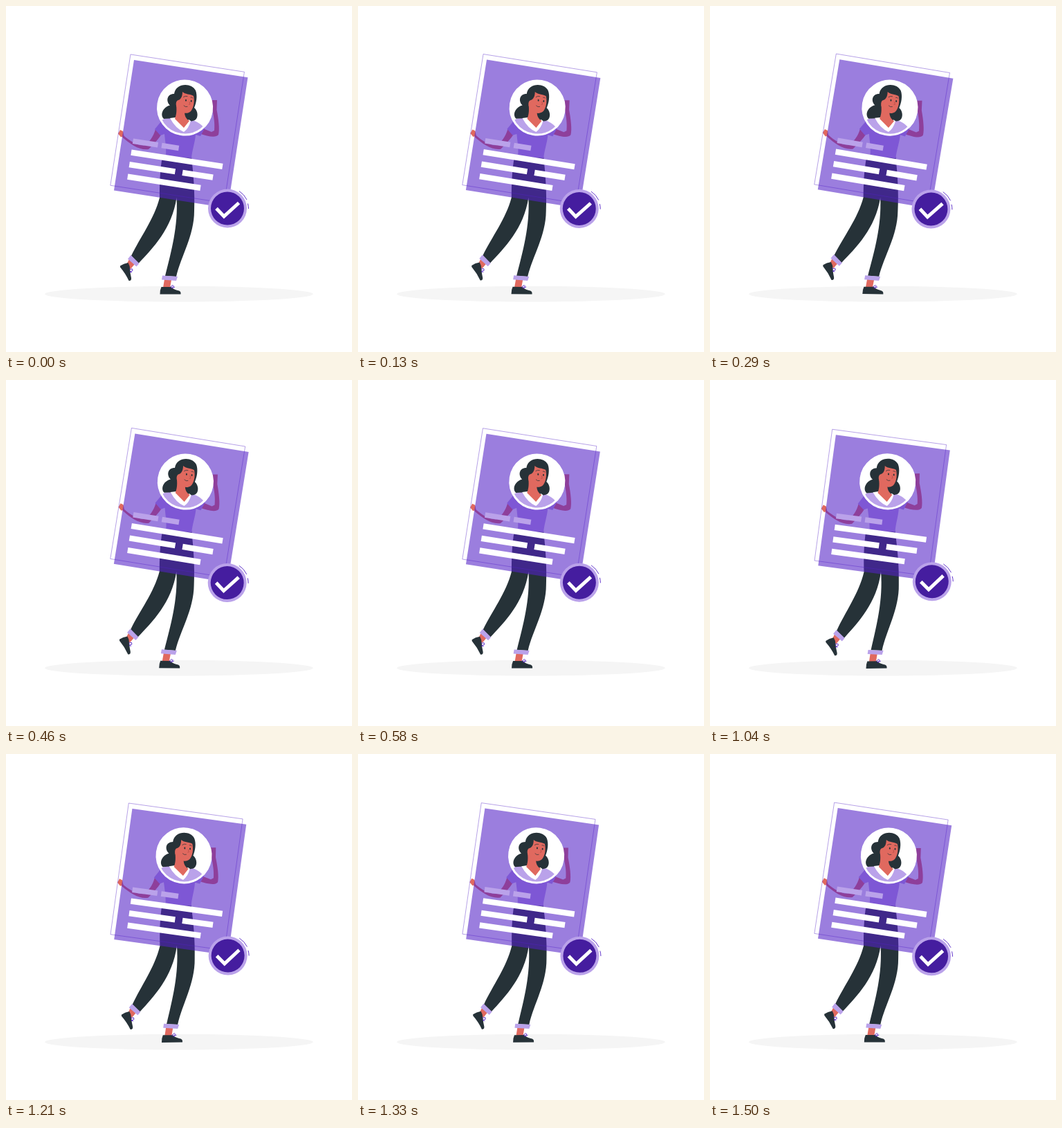
An HTML page for the animation above (1.54 s loop, 500x500 px).

```html
<!DOCTYPE html>
<html lang="en">
<head>
<meta charset="utf-8">
<title>Verified profile</title>
<style>
  html, body { margin: 0; height: 100%; overflow: hidden; background: #fff; }
  svg { display: block; width: 100vw; height: 100vh; }
  .dark { fill: #263238; }
  .skin { fill: #e0695f; }
  .lilac { fill: #baa2ea; }
  .white { fill: #fff; }
  .line { fill: none; stroke: #5322c6; }
  .ink { fill: none; stroke: #263238; stroke-width: .7; stroke-linecap: round; }
</style>
</head>
<body>
<svg viewBox="0 0 500 500">
  <ellipse cx="250" cy="416.2" rx="193.9" ry="11.3" fill="#f5f5f5"/>
  <g id="figure">
    <!-- feet -->
    <path class="skin" d="M229 395L239 396L237 407H227ZM178 366L186 373L180 380L174 374Z"/>
    <path class="dark" d="M224.5 406H238.5C242 409.500 246 410.500 250 411.500Q253 412.500 252.500 416.500H222.500Q222.500 410 224.500 406Z"/>
    <path class="dark" d="M165 375.500Q170 372 176.500 371Q179 375 179.300 381Q179.500 387 181 393Q181.500 397.500 177.500 397Q173 387 165 377.500Z"/>
    <path class="line" stroke-width=".9" d="M237 406.500L241 403.500L242.500 405L239 408L244 406M178.500 380.500L182.500 380L183 382.500L179 384L182 385"/>

    <!-- legs -->
    <path class="dark" d="M226 217C222 240 222 260 222 277C214 308 194 334 181 361L191.500 372C212 350 240 322 246.500 277C249 318 239 354 230 390L246 391C253 361 272 332 272 296C273 268 271 245 268 218Z"/>
    <path class="lilac" d="M226 389.500L248 391L246 397L225 395.500ZM180.500 360L192.500 372L188.500 376.500L176 365.500Z"/>

    <!-- arms -->
    <path class="skin" d="M216 178C213 189 207 197 200 201.500C189 202 179 195 169 186.500L168 189.500C180 200 193 209 206 207C213 200 220 193 225 185Z"/>
    <path class="skin" d="M162 184.500L165 179L169 181L170.500 188L166 189.500Z"/>
    <path class="skin" d="M282 176L297 182L301 180C302 168 300 160 298.500 150L297.500 136H305L304.500 150C307 163 309 178 307 186C303 191 292 188.500 279 184Z"/>

    <!-- torso -->
    <path class="lilac" d="M238 162C231 162 226 163 224 167L215 178L223 187L229 185C230 196 232 206 231 217L268 220C269 208 273 198 274 186L281 188L287 177C281 169 273 165 264 164Z"/>

    <!-- head -->
    <path class="dark" d="M243 127C245 111 268 110 274 122C277 130 275 140 272 147C278 152 278 162 273 165C267 168 260 166 257 160L246 162L228 163C222 157 227 146 237 143.500C231 138 232 127 243 127Z"/>
    <path class="white" d="M237 162L245 161L257 174L264 164L267 166Q264 177 257 182Q245 177 237 162Z"/>
    <path class="skin" d="M246 143C247 152 246 158 244 163L257 176L265 166C260 163 258 159 258 152Z"/>
    <path class="skin" d="M255 124C259 128 266 127 271 130C273 138 271 149 266 153C260 157 252 154 250 148C245 148 244 137 249 136C253 135 255 130 255 124Z"/>
    <g class="dark"><ellipse cx="260" cy="136.200" rx="1" ry="1.500"/><ellipse cx="267.700" cy="137.300" rx="1" ry="1.500"/></g>
    <path class="ink" d="M256.500 131.500Q259 129.500 262 130.500M267 132Q269 131.500 270 133M257 144Q259 146.500 262 145.500"/>
    <path class="line" style="stroke:#b84c47" stroke-width=".8" d="M265 138L266 142L264 142.300"/>

    <!-- card -->
    <g transform="translate(185 78) rotate(8.75)">
      <path fill="#5322c6" fill-opacity=".58" fill-rule="evenodd" d="M0 0H166.400V190.800H0ZM43.200 57a40 40 0 0 0 80 0a40 40 0 0 0 -80 0Z"/>
      <circle cx="83.200" cy="57" r="39" fill="none" stroke="#fff" stroke-width="3"/>
      <rect class="line" x="-6.200" y="-7.200" width="166.400" height="191.500" stroke-width=".4"/>
      <g class="lilac">
        <rect x="16.300" y="112.300" width="36.500" height="7.600"/>
        <rect x="58.300" y="112.300" width="25" height="7.600"/>
      </g>
      <g class="white">
        <rect x="16.300" y="128.500" width="133.500" height="8.300"/>
        <rect x="16.300" y="146.200" width="67" height="8.300"/>
        <rect x="94" y="146.200" width="44.500" height="8.300"/>
        <rect x="16.500" y="163.900" width="106.500" height="8.300"/>
      </g>
    </g>

    <!-- badge -->
    <circle class="lilac" cx="320" cy="292.500" r="28"/>
    <circle cx="320" cy="292.500" r="24" fill="#451d9f"/>
    <path fill="none" stroke="#fff" stroke-width="5" d="M304 292.500L315 304L336.500 284.500"/>
    <path class="line" stroke-width=".9" d="M337 267.500A30.500 30.500 0 0 1 348 280M349.500 285.500A30.500 30.500 0 0 1 350.500 293"/>
  </g>
</svg>
<script>
  const figure = document.getElementById('figure');
  const LOOP = 1540, LEAD = 65, REST = 0.17;

  // Linear sway between +1 and -1 degree.
  function sway(time) {
    const phase = ((time + LEAD) / LOOP + 0.75) % 1;
    return 4 * Math.abs(phase - 0.5) - 1;
  }

  function draw() {
    const angle = sway(performance.now()) - REST;
    figure.setAttribute('transform', `rotate(${angle} 250 250)`);
    requestAnimationFrame(draw);
  }
  draw();
</script>
</body>
</html>
```
